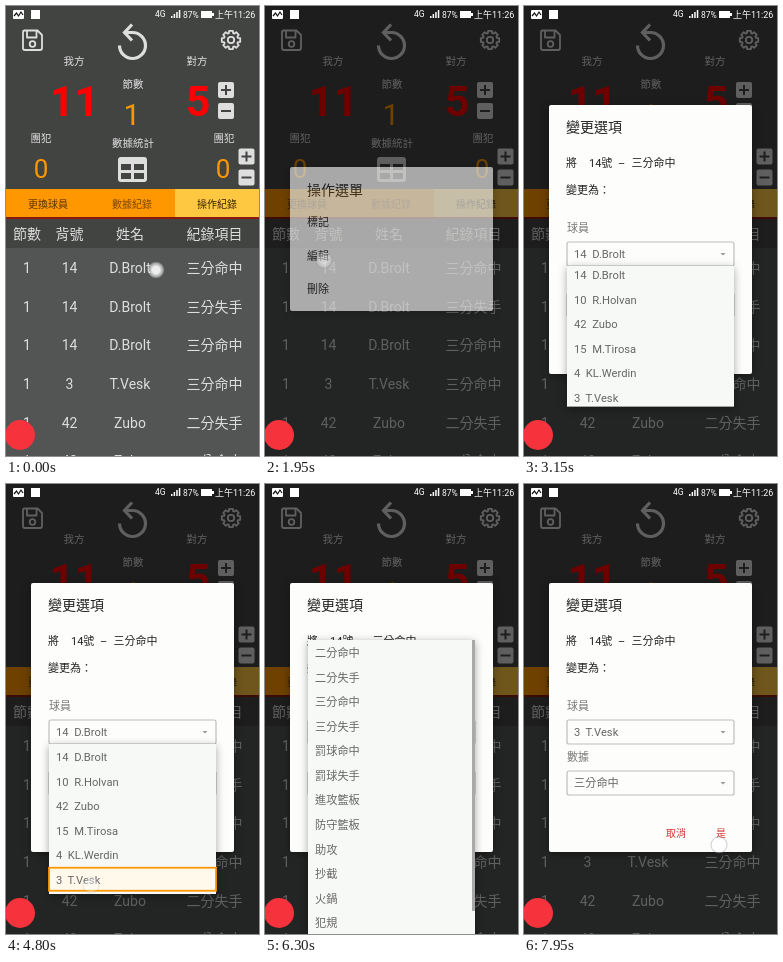
These frames come from a looping animation (253x450 px, 8000 ms). An HTML page:

```html
<!DOCTYPE html>
<html lang="zh-Hant">
<head>
<meta charset="utf-8">
<style>
html, body { margin: 0; height: 100%; overflow: hidden; background: #000; }
svg { display: block; width: 253px; height: 450px; }
text { font-family: Roboto, "Noto Sans CJK TC", "Noto Sans CJK SC", "Noto Sans CJK JP", sans-serif; white-space: pre; }
.shadow { filter: drop-shadow(0 2px 4px rgba(0,0,0,.35)); }
</style>
</head>
<body>
<svg id="stage" viewBox="0 0 253 450"></svg>
<script>
const LOOP = 8000, STEP = 150, ROW = 24.55;
const players = [['14', 'D.Brolt'], ['10', 'R.Holvan'], ['42', 'Zubo'], ['15', 'M.Tirosa'], ['4', 'KL.Werdin'], ['3', 'T.Vesk']]
  .map(p => p.join('  '));
const stats = ['二分命中', '二分失手', '三分命中', '三分失手', '罰球命中', '罰球失手', '進攻籃板', '防守籃板', '助攻', '抄截', '火鍋', '犯規'];
const records = [
  ['1', '14', 'D.Brolt', '三分命中'], ['1', '14', 'D.Brolt', '三分失手'], ['1', '14', 'D.Brolt', '三分命中'],
  ['1', '3', 'T.Vesk', '三分命中'], ['1', '42', 'Zubo', '二分失手'], ['1', '42', 'Zubo', '二分命中']];
// start, end, x, y of each touch
const touches = [
  [0, 1050, 150, 264], [1650, 2100, 59, 254], [2700, 3000, 130, 249], [4500, 4950, 85, 401],
  [5700, 5850, 130, 300], [7050, 7200, 85, 220], [7800, 8000, 195, 361]];

// y is the vertical middle of the glyphs
const text = (x, y, s, size, fill, anchor = 'start', extra = '') =>
  `<text x="${x}" y="${y + size * .37}" font-size="${size}" fill="${fill}" text-anchor="${anchor}" ${extra}>${s}</text>`;
const mid = (x, y, s, size, fill, extra) => text(x, y, s, size, fill, 'middle', extra);
const rect = (x, y, w, h, fill, extra = '') =>
  `<rect x="${x}" y="${y}" width="${w}" height="${h}" fill="${fill}" ${extra}/>`;
const group = (id, body, extra = '') => `<g id="${id}" ${extra}>${body}</g>`;
const each = (list, fn) => list.map(fn).join('');

const LIGHT = '#dedede', ORANGE = '#ff9800', DARK = '#424442', PAPER = '#fdfefc';

function gear(cx, cy) {
  const pts = [];
  for (let k = 0; k < 8; k++)
    for (const [da, r] of [[-.3, 7.2], [-.2, 9.4], [.2, 9.4], [.3, 7.2]]) {
      const a = k * Math.PI / 4 + da;
      pts.push((cx + r * Math.cos(a)).toFixed(1) + ',' + (cy + r * Math.sin(a)).toFixed(1));
    }
  return `<polygon points="${pts}"/><circle cx="${cx}" cy="${cy}" r="3.2"/>`;
}

const stepper = (x, y, plus) => rect(x - 8, y - 8, 16, 16, LIGHT, 'rx="2"') +
  `<path d="M${x - 5} ${y}h10${plus ? `M${x} ${y - 5}v10` : ''}" stroke="${DARK}" stroke-width="2"/>`;

const icons = `<g fill="none" stroke="${LIGHT}" stroke-width="1.8" stroke-linejoin="round">
  <path d="M18.500 24.500h13l4.500 4.500v13q0 2-2 2h-15q-2 0-2-2v-15.500q0-2 1.500-2zM21 25v6.500h9.500v-6.500"/>
  <circle cx="26.500" cy="38" r="2.800"/>
  <path stroke-width="3.200" stroke-linejoin="miter" d="M126 18.500l-7.500 8 7.500 8M119 26.500h7.500a13 13 0 1 1-13 13"/>
  ${gear(225, 34)}</g>`;

const board = rect(0, 0, 253, 450, DARK) + icons +
  each([[68, 55, '我方'], [191, 55, '對方'], [127, 78, '節數'], [35, 132, '團犯'], [218, 132, '團犯'], [127, 137, '數據統計']],
    ([x, y, s]) => mid(x, y, s, 10.5, LIGHT)) +
  mid(68.5, 94.3, '11', 43, '#f00', 'font-weight="700"') + mid(192, 94.3, '5', 43, '#f00', 'font-weight="700"') +
  mid(126, 108, '1', 30, ORANGE) + mid(35, 162, '0', 26, ORANGE) + mid(217, 162, '0', 26, ORANGE) +
  stepper(220, 84, true) + stepper(220, 105) + stepper(240.5, 150.5, true) + stepper(240.5, 171.5) +
  rect(112, 151, 29, 25, LIGHT, 'rx="3"') +
  each([[115, 158], [128, 158], [115, 167], [128, 167]], ([x, y]) => rect(x, y, 10, 6, DARK)) +
  rect(0, 183, 169, 29, ORANGE) + rect(169, 183, 84, 29, '#ffc840') + rect(0, 211, 253, 2, '#8c1a0c') +
  mid(42, 198, '更換球員', 10, '#5a3200') + mid(126, 198, '數據紀錄', 10, '#7a4600') + mid(211, 198, '操作紀錄', 10, '#332200') +
  rect(0, 242, 253, 208, '#525554') +
  group('pressed', rect(0, 242, 253, 39, '#a8783a')) +
  each([['節數', '背號', '姓名', '紀錄項目'], ...records], (row, i) =>
    each(row, (s, c) => mid([21, 63.5, 124, 208.4][c], i ? 262 + (i - 1) * 38.6 : 228, s, 14, LIGHT)));

const status = rect(7, 4, 11, 9, '#fff', 'rx="1"') +
  '<path d="M8 10l2.500-3 2 3 2.500-4 2 3" fill="none" stroke="#111" stroke-width="1.200"/>' +
  rect(25, 4, 9, 9, '#fff') +
  text(149, 8, '4G', 8.5, '#fff') +
  each([2, 4, 6, 8], (h, i) => rect(165 + i * 2.6, 12 - h, 1.5, h, '#fff')) +
  text(177, 8.5, '87%', 8.5, '#fff') + rect(195, 5, 11, 7, '#fff') + rect(206, 7, 2, 3, '#fff') +
  text(209, 8.5, '上午11:26', 9, '#fff');

const menu = rect(25, 161, 203, 144, PAPER, 'rx="2" class="shadow"') + text(42, 184, '操作選單', 14, '#222') +
  each(['標記', '編輯', '刪除'], (s, i) => text(42, 216 + i * 33.5, s, 11, '#222'));

const spinner = (id, y, s) => rect(43, y - 12, 167, 24, PAPER, 'rx="2" stroke="#bdbdbd" stroke-width="1.2"') +
  text(50, y, s, 11.2, '#666', 'start', `id="${id}"`) + `<path d="M196.500 ${y - 1}h5l-2.500 2.500z" fill="#999"/>`;

const dialog = rect(25, 99, 203, 269, PAPER, 'rx="2" class="shadow"') + text(42, 121, '變更選項', 14, '#222') +
  each([[42, '將'], [65, '14號'], [94, '–'], [107.5, '三分命中']], ([x, s]) => text(x, 157, s, 11, '#222')) +
  text(42, 184, '變更為：', 11, '#222') + text(43, 222, '球員', 11, '#777') + text(43, 273, '數據', 11, '#777') +
  spinner('player', 248, players[0]) + spinner('stat', 299, stats[2]) +
  mid(152, 349, '取消', 10, '#d3302f', 'font-weight="500"') + mid(197, 349, '是', 10, '#d3302f', 'font-weight="500"');

function popup(id, top, height, items, picked) {
  return `<clipPath id="${id}Clip">${rect(42, top, 169, height, '#000', `id="${id}Mask"`)}</clipPath>` +
    group(id, rect(43, top, 167, height, '#f7f9f6', `id="${id}Panel" class="shadow"`) +
      group(id + 'Box', group(id + 'Items',
        group(id + 'Pick', rect(43, top + picked * ROW + 1, 167, 23, '#fff9ec', `stroke="${ORANGE}" stroke-width="1.8"`)) +
        each(items, (s, i) => text(50, top + 13 + i * ROW, s, 11.2, '#666'))), `clip-path="url(#${id}Clip)"`));
}

const $ = id => document.getElementById(id);
$('stage').innerHTML = `<radialGradient id="glow">
    <stop offset=".45" stop-color="#fff" stop-opacity=".9"/><stop offset="1" stop-color="#fff" stop-opacity=".3"/>
  </radialGradient>` + board +
  rect(0, 0, 253, 450, '#000', 'id="dim"') +
  group('menu', menu) + group('dialog', dialog) +
  popup('names', 260, 150, players, 5) + popup('kinds', 156, 300, stats, 2) +
  group('bar', rect(207, 156, 3, 271, '#a9a9a9')) +
  status + '<circle cx="14" cy="429" r="15" fill="#f6333c"/>' +
  '<circle id="touch" r="8" fill="url(#glow)" stroke="#777" stroke-opacity=".3" stroke-width="1.200"/>';

const ramp = (t, a, b) => Math.min(1, Math.max(0, (t - a) / (b - a)));
const show = (id, alpha) => {
  $(id).setAttribute('opacity', alpha);
  $(id).style.display = alpha > 0 ? '' : 'none';
};

// unroll downwards, fade away on closing
function unroll(id, height, t, open, press, close) {
  const p = 1 - (1 - ramp(t, open, open + 300)) ** 4;
  show(id, p ? 1 - ramp(t, close, close + 300) : 0);
  for (const part of ['Mask', 'Panel']) $(id + part).setAttribute('height', height * p);
  $(id + 'Items').setAttribute('transform', `translate(0 ${-64 * (1 - p)})`);
  show(id + 'Pick', +(t >= press));
}

function draw(now) {
  const t = Math.floor(now % LOOP / STEP) * STEP;
  show('pressed', .75 * ramp(t, 0, 600) * (1 - ramp(t, 1650, 1950)));
  show('dim', .57 * ramp(t, 450, 900));
  show('menu', ramp(t, 450, 900) * (1 - .38 * ramp(t, 1800, 1950) - .62 * ramp(t, 1950, 2100)));
  show('dialog', ramp(t, 1950, 2250));
  unroll('names', 150, t, 3000, 4500, 4950);
  unroll('kinds', 300, t, 5850, 7050, 7200);
  show('bar', ramp(t, 6000, 6150) * (1 - ramp(t, 6450, 6750)));
  $('player').textContent = players[t < 5100 ? 0 : 5];
  const hit = touches.find(([a, b]) => t >= a && t < b);
  show('touch', hit ? 1 - .5 * ramp(t, hit[1] - 300, hit[1] - 150) * (hit[1] < LOOP) : 0);
  if (hit) {
    $('touch').setAttribute('cx', hit[2]);
    $('touch').setAttribute('cy', hit[3]);
  }
  requestAnimationFrame(draw);
}
requestAnimationFrame(draw);
</script>
</body>
</html>
```
